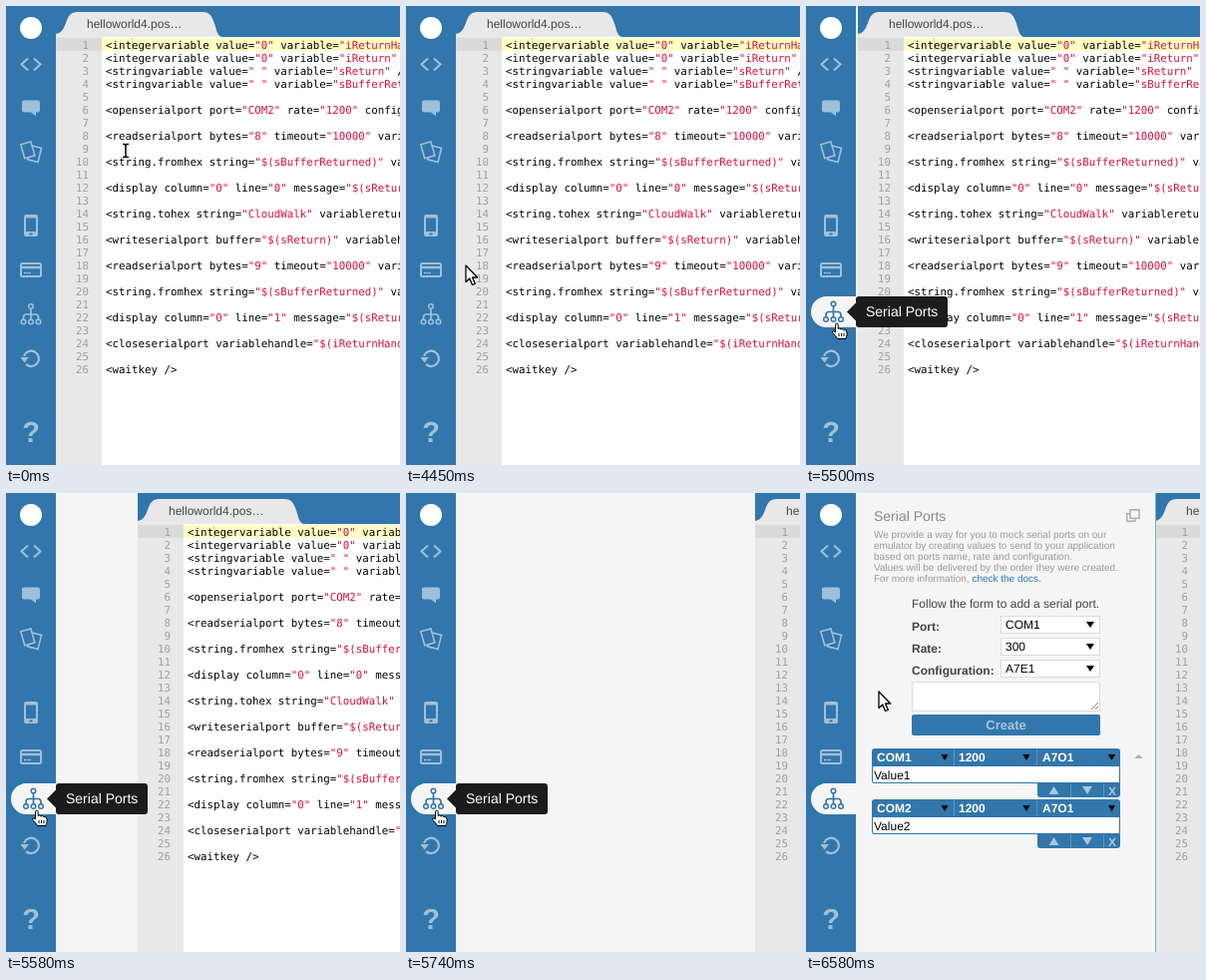
An HTML page that plays this animation: 395 px wide and 460 px high, repeating every 9780 ms.

```html
<!DOCTYPE html>
<html lang="en">
<head>
<meta charset="utf-8">
<title>Serial Ports</title>
<style>
  html, body { margin: 0; width: 100%; height: 100%; overflow: hidden; background: #fff; }
  svg { display: block; width: 395px; height: 460px; }
  text { font-family: "Liberation Sans", Arial, sans-serif; font-size: 12px; text-rendering: geometricPrecision; white-space: pre; }
  .code text { font-family: "DejaVu Sans Mono", monospace; font-size: 10.797px; }
  .code .num { fill: #9f9f9f; text-anchor: end; }
  .str { fill: #d8123f; }
  .b { font-weight: bold; }
  .blue { fill: #3276ab; }
  .pale { fill: #a9c6dd; }
  .box { fill: #fff; stroke: #dcdcdc; }
  .desc text { font-size: 10px; fill: #999; }
  .icon { color: #9fc0da; }
  .line { fill: none; stroke: currentColor; stroke-width: 2; }
  .solid { fill: currentColor; }
  .cur { fill: #fff; stroke: #000; stroke-linejoin: round; }
</style>
</head>
<body>
<svg viewBox="0 0 395 460">
  <rect class="blue" width="395" height="460"/>

  <rect x="50" width="300" height="460" fill="#f5f5f5"/>
  <g id="panel"></g>

  <g id="editor">
    <rect class="blue" x="50" width="395" height="31"/>
    <path d="M50 31V28C58 27 59 18 62 12C64 8 67 6 72 6H197C203 6 206 9 208 15C211 22 211 29 216 31Z" fill="#e8e8e8"/>
    <text x="81" y="22" fill="#444">helloworld4.pos…</text>
    <rect x="50" y="31" width="46" height="429" fill="#e8e8e8"/>
    <rect x="50" y="32" width="46" height="13" fill="#dadada"/>
    <rect x="96" y="31" width="349" height="429" fill="#fff"/>
    <rect x="96" y="32" width="349" height="13" fill="#ffffc4"/>
    <rect x="126" y="32" width="1" height="13" fill="#dccf9a"/>
    <g class="code" id="code"></g>
  </g>
  <rect id="edge" x="350" width="1" height="460" fill="#8fa9bd"/>

  <rect class="blue" width="50" height="460"/>
  <circle cx="25" cy="22" r="11" fill="#fff"/>
  <g class="icon">
    <path class="line" d="M22 52.5L15.5 58.5L22 64.5M28 52.5L34.5 58.5L28 64.5"/>
    <path class="solid" d="M18 94.500H32Q34 94.500 34 96.500V104.500Q34 106.500 32 106.500H30V110.500L25 106.500H18Q16 106.500 16 104.500V96.500Q16 94.500 18 94.500Z"/>
    <g class="line" style="stroke-width:1.6">
      <rect x="23.500" y="141" width="10.500" height="14.500" transform="rotate(14 29 148)"/>
      <rect class="blue" x="16.500" y="137" width="10.500" height="14.500" transform="rotate(-16 22 144)"/>
    </g>
    <path class="solid" fill-rule="evenodd" d="M20 209H30Q32 209 32 211V229Q32 231 30 231H20Q18 231 18 229V211Q18 209 20 209ZM20 212.500V226H30V212.500ZM23.500 227.500V229.500H26.500V227.500Z"/>
    <g id="card">
      <rect class="line" x="15" y="258" width="20" height="13" rx="1.500"/>
      <path class="line" d="M15 262H35" style="stroke-width:2.500"/>
      <path class="line" d="M18 267.500H25" style="stroke-width:1.500" stroke-dasharray="2 .6"/>
    </g>
    <path class="line" d="M18.500 357A7.700 7.700 0 1 0 19 348.500" style="stroke-width:2.200" transform="rotate(-18 26 353)"/>
    <path class="solid" d="M14.500 352H23L18.500 357.500Z"/>
    <text class="b solid" x="25" y="437" text-anchor="middle" style="font-size:29px">?</text>
  </g>
  <rect id="pill" x="5" y="291" width="60" height="31" rx="15.500" fill="#f5f5f5" clip-path="inset(0 15px 0 0)"/>
  <g id="ports">
    <path class="line" style="stroke-width:1.700" d="M25 303.500V314.500M17.500 314.500V312Q17.500 309 20.500 309H29.500Q32.500 309 32.500 312V314.500"/>
    <g class="line" style="stroke-width:1.500">
      <circle cx="25" cy="301" r="2.300"/><circle cx="17.500" cy="316.500" r="2.300"/>
      <circle cx="25" cy="316.500" r="2.300"/><circle cx="32.500" cy="316.500" r="2.300"/>
    </g>
  </g>

  <g id="tip">
    <path fill="#1c1c1c" d="M41 306.500L50 297.500V294Q50 291 53 291H139Q142 291 142 294V319Q142 322 139 322H53Q50 322 50 319V315.500Z"/>
    <text x="60" y="311" fill="#fff" style="font-size:14px">Serial Ports</text>
  </g>

  <g id="beam" fill="none">
    <path d="M-3 -6.500H-1L0 -5.500L1 -6.500H3M0 -6V6M-3 6.500H-1L0 5.500L1 6.500H3" stroke="#fff" stroke-width="3.500"/>
    <path d="M-3 -6.500H-1L0 -5.500L1 -6.500H3M0 -6V6M-3 6.500H-1L0 5.500L1 6.500H3" stroke="#000" stroke-width="1.500"/>
  </g>
  <g id="hand">
    <path class="cur" d="M-.5 1.500Q-.5 .2 .8 .2Q2.200 .2 2.200 1.500V5.500Q3.500 4.500 5 6Q6.500 5 7.800 6.500Q11 6 11 9V12Q10.500 13 10 15.500H1.500Q0 12.500 -3.500 9.500Q-4 7.500 -2 7.800L-.5 9Z"/>
    <path d="M3 10V13M5.500 10V13M8 10V13" stroke="#000"/>
  </g>
  <path id="arrow" class="cur" stroke-width="1.300" d="M0 0V16.500L3.800 13L6.500 19.500L9.300 18.300L6.500 12H11.700Z"/>
</svg>

<script>
const $ = id => document.getElementById(id);
const LOOP = 9780;

const lines = [
  '<integervariable value="0" variable="iReturnHandle" />',
  '<integervariable value="0" variable="iReturn" />',
  '<stringvariable value=" " variable="sReturn" />',
  '<stringvariable value=" " variable="sBufferReturned" />',
  '', '<openserialport port="COM2" rate="1200" configuration="" />',
  '', '<readserialport bytes="8" timeout="10000" variablereturn="" />',
  '', '<string.fromhex string="$(sBufferReturned)" variablereturn="" />',
  '', '<display column="0" line="0" message="$(sReturn)" />',
  '', '<string.tohex string="CloudWalk" variablereturn="" />',
  '', '<writeserialport buffer="$(sReturn)" variablehandle="" />',
  '', '<readserialport bytes="9" timeout="10000" variablereturn="" />',
  '', '<string.fromhex string="$(sBufferReturned)" variablereturn="" />',
  '', '<display column="0" line="1" message="$(sReturn)" />',
  '', '<closeserialport variablehandle="$(iReturnHandle)" />',
  '', '<waitkey />'
];
const paint = s => s.replace(/</g, '&lt;')
  .replace(/"[^"]*"/g, m => `<tspan class="str">${m}</tspan>`);
$('code').innerHTML = lines.map((s, i) => {
  const y = 42.5 + 13 * i;
  return `<text class="num" x="83" y="${y}">${i + 1}</text><text x="100" y="${y}">${paint(s)}</text>`;
}).join('');

const text = (x, y, s, attrs = '') => `<text x="${x}" y="${y}" ${attrs}>${s}</text>`;
const down = (x, y, w = 4, h = 6) => `<path d="M${x - w} ${y - h / 2}h${2 * w}l${-w} ${h}z"/>`;
const up = (x, y, w, h) => `<path d="M${x - w} ${y + h / 2}h${2 * w}l${-w} ${-h}z"/>`;

const field = (label, value, y) =>
  text(106, y + 15, label, 'class="b" fill="#444"') +
  `<rect class="box" x="195.5" y="${y + .5}" width="99" height="17"/>` +
  text(200, y + 13, value) + down(285, y + 9);

const port = (y, name, value) => `
  <path class="blue" d="M66 ${y + 18}v-15q0-3 3-3h243q3 0 3 3v15zM232 ${y + 34}h83v12q0 3-3 3h-77q-3 0-3-3z"/>
  <path d="M148.5 ${y}v17M231.500 ${y}v17M265.500 ${y + 35}v14M298.500 ${y + 35}v14" stroke="#5f96c0"/>
  <rect x="66.5" y="${y + 17.5}" width="248" height="17" rx="1.5" fill="#fff" stroke="#3276ab"/>
  ${[[71, name], [153, '1200'], [237, 'A7O1']].map(([x, s]) => text(x, y + 13, s, 'class="b" fill="#fff"')).join('')}
  ${[139, 221, 306.5].map(x => down(x, y + 9, 3.5)).join('')}
  ${text(68, y + 31, value)}
  <g class="pale">${up(248.5, y + 42, 5, 8)}${down(282, y + 42, 5, 8)}
  ${text(307, y + 46.5, 'X', 'class="b" text-anchor="middle"')}</g>`;

const intro = [
  'We provide a way for you to mock serial ports on our',
  'emulator by creating values to send to your application',
  'based on ports name, rate and configuration.',
  'Values will be delivered by the order they were created.',
  'For more information, <tspan class="blue">check the docs.</tspan>'
];
$('panel').innerHTML =
  text(68, 28, 'Serial Ports', 'fill="#888" style="font-size:14px"') +
  `<g fill="#f5f5f5" stroke="#b0b0b0" stroke-width="1.6"><rect x="321.8" y="20.8" width="8" height="7.500"/>
   <rect x="325" y="16.800" width="9" height="8.500"/></g>` +
  `<g class="desc">${intro.map((s, i) => text(68, 45 + 11 * i, s)).join('')}</g>` +
  text(106, 115, 'Follow the form to add a serial port.', 'fill="#444"') +
  field('Port:', 'COM1', 123) + field('Rate:', '300', 145) + field('Configuration:', 'A7E1', 167) +
  `<rect class="box" x="106.5" y="189.5" width="188" height="29"/>
   <path d="M286 217L293 210M290 217L293 214" stroke="#888"/>
   <rect class="blue" x="106" y="222" width="189" height="21" rx="2"/>` +
  text(200.5, 237, 'Create', 'class="b pale" text-anchor="middle" style="font-size:13px"') +
  port(256, 'COM1', 'Value1') + port(307, 'COM2', 'Value2') +
  `<g fill="#aaa">${up(333.5, 264, 4, 4)}</g>`;

const mix = (a, b, p) => a + (b - a) * p;
const move = (a, b, p) => [mix(a[0], b[0], p), mix(a[1], b[1], p)];
const REST = [120, 145], LEAVE = [116, 155], PORTS = [30, 317.5], END = [72.5, 198.5];

function pointer(t) {
  if (t < 3970) return REST;
  if (t < 6060) {
    const p = Math.min(1, Math.floor((t - 3970) / 41.4) / 21);
    return move(LEAVE, PORTS, 1 - (1 - p) ** 1.4);
  }
  const p = Math.min(1, (Math.floor((t - 6060) / 40) + 1) / 14);
  return move(PORTS, END, p * p * (3 - 2 * p));
}

// editor offset, one value every 40 ms
const slide = [2, 29, 82, 150, 218, 271, 300];
const shift = t => t < 5500 ? 0 : slide[Math.min(6, Math.floor((t - 5500) / 40))];

const show = (id, on) => $(id).setAttribute('visibility', on ? 'visible' : 'hidden');

function draw(t) {
  const [x, y] = pointer(t);
  const bar = x < 50, active = t >= 5500, open = t >= 5780;
  const onPorts = bar && y > 287, onCard = bar && y > 243 && y <= 287;
  const kind = bar ? 'hand' : x >= 96 ? 'beam' : 'arrow';

  $('editor').setAttribute('transform', `translate(${shift(t)} 0)`);
  show('panel', open);
  show('edge', open);
  show('pill', active);
  show('tip', onPorts);
  $('ports').style.color = active ? '#3276ab' : onPorts ? '#fff' : '#9fc0da';
  $('ports').setAttribute('transform', active ? 'translate(2.5 -2.5)' : '');
  $('card').style.color = onCard ? '#fff' : '';
  for (const id of ['beam', 'hand', 'arrow']) show(id, id === kind);
  $(kind).setAttribute('transform', `translate(${Math.round(x)} ${Math.round(y)})`);
}

function tick() {
  draw(performance.now() % LOOP);
  requestAnimationFrame(tick);
}
tick();
</script>
</body>
</html>
```
